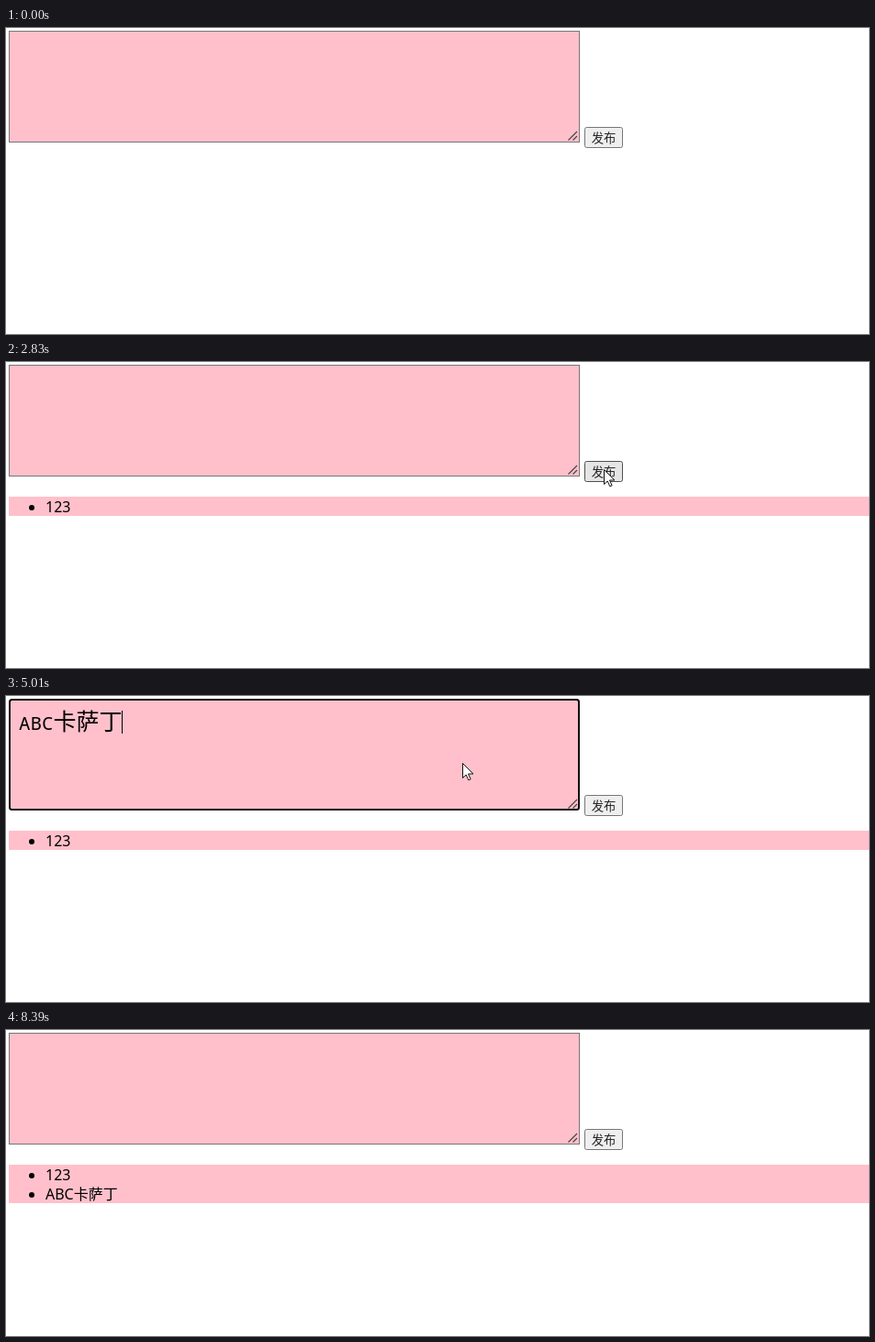
Write an HTML page that moves like this. It is 940 by 334 pixels and loops after 8.85 s.

```html
<!DOCTYPE html>
<html lang="zh-CN">
<head>
<meta charset="utf-8">
<title>发布</title>
<style>
  html, body { margin: 0; width: 100%; height: 100%; overflow: hidden; background: #fff; }
  svg { display: block; width: 940px; height: 334px; }
  text { white-space: pre; }
  .ui { font-family: "Noto Sans", "Noto Sans CJK SC", "Noto Sans CJK", sans-serif; }
  .item { font-size: 16px; }
  .button { font-size: 13.33px; fill: #222; }
  .ime { font-size: 22.6px; }
  .small { font: 25px "Liberation Serif", serif; }
  .caps { font: 300 20.8px "Noto Sans Mono", monospace; }
  .han { font: 300 25px "Noto Sans CJK SC", "Noto Sans CJK", sans-serif; }
</style>
</head>
<body>
<svg id="stage" viewBox="0 0 940 334" xmlns="http://www.w3.org/2000/svg"></svg>
<script>
const stage = document.getElementById('stage');
const LOOP = 8850, BLINK = 530, PINK = '#ffc0cb';
const FIRST = '123', SECOND = 'ABC卡萨丁';

// [time, field text, input candidates]; caret blinking restarts at each entry
const edits = [
  [0, ''],
  [460, ''],
  [1250, '1'],
  [1315, '12'],
  [1380, FIRST],
  [2830, ''],
  [3500, ''],
  [4100, 'a', '啊 阿 按 爱 安 暗 俺'],
  [4230, 'a’b', '阿布 阿爸 安保 岸边 阿宝 按不 奥巴'],
  [4360, 'a’b’c', '按不出 阿百川 ABC 阿布 北禾川谷银行 安保 岸边'],
  [4750, 'a’b’c’k’s', 'ABC开始 按不出 阿百川 ABC 阿布 安保 岸边'],
  [4820, 'a’b’c’k’s’d', 'ABC卡萨丁 按不出 阿百川 ABC 阿布 安保 岸边'],
  [5010, SECOND],
  [6670, '']
];

// Pointer moves: start, end, steps, destination
const START = [672, 189];
const moves = [
  [130, 460, 6, 423, 43],
  [2170, 2570, 7, 651, 117],
  [2960, 3300, 6, 497, 73],
  [5940, 6210, 5, 652, 118],
  [8330, 8330, 1, 711, 167]
];

const within = (t, a, b) => t >= a && t < b;
const inside = (p, x, y, w, h) => within(p[0], x, x + w) && within(p[1], y, y + h);
const isAscii = c => c.charCodeAt(0) < 128 || c === '’';
const rect = (x, y, w, h, fill, more = '') =>
  `<rect x="${x}" y="${y}" width="${w}" height="${h}" fill="${fill}" ${more}/>`;
const label = (x, y, cls, s, more = '') =>
  `<text x="${x}" y="${y}" class="${cls}" ${more}>${s}</text>`;
const line = (d, color, width = 1) =>
  `<path d="${d}" fill="none" stroke="${color}" stroke-width="${width}"/>`;

function pointerAt(t) {
  if (!within(t, 130, 8390)) return null;
  let p = START;
  moves.forEach(([from, to, n, x, y], i) => {
    if (t < from) return;
    const span = to - from || 1;
    const k = Math.min(n - 1, Math.floor((t - from) / span * (n - 1) + 1e-6));
    const f = i ? (k + 1) / n : k / (n - 1);
    const e = f * (2 - f);
    p = [Math.round(p[0] + (x - p[0]) * e), Math.round(p[1] + (y - p[1]) * e)];
  });
  return p;
}

// Half-width cells for Latin, full-width for Chinese
function fieldText(s) {
  let x = 14, out = '';
  for (const c of s) {
    const cls = !isAscii(c) ? 'han' : /[A-Z]/.test(c) ? 'caps' : 'small';
    out += label(x, 37, cls, c);
    x += isAscii(c) ? 12.5 : 25;
  }
  return { out, end: Math.floor(x) };
}

function field(t, edit, focused) {
  const { out, end } = fieldText(edit[1]);
  const caret = focused && Math.floor((t - edit[0]) / BLINK) % 2 === 0;
  return (focused
    ? rect(4, 4, 620, 120, PINK, 'rx="2.5" stroke="#101010" stroke-width="2"')
    : rect(3.5, 3.5, 621, 121, PINK, 'stroke="#767676"')) +
    line('M612.5 122.5L622 113M617.5 122.5L622 118', '#444', 1.2) +
    out + (caret ? rect(end, 16, 1, 25, '#000') : '');
}

function button(hover, pressed) {
  const [fill, edge] = pressed ? ['#f5f5f5', '#8d8d8d']
    : hover ? ['#e5e5e5', '#4f4f4f'] : ['#efefef', '#767676'];
  return rect(630.5, 108.5, 41, 22, fill, `rx="2" stroke="${edge}"`) +
    label(651, 124.5, 'ui button', '发布', 'text-anchor="middle"');
}

function list(items) {
  return items.map((s, i) => {
    const y = 147 + 21 * i;
    return rect(3, y, 937, 21, PINK) + `<circle cx="28" cy="${y + 12}" r="3"/>` +
      label(43, y + 17, 'ui item', s);
  }).join('');
}

function candidates(words) {
  let x = 16, out = rect(15.5, 39.5, 940, 55, '#fff', 'stroke="#e0e0e0"');
  words.split(' ').forEach((word, i) => {
    const width = 54 + [...word].reduce((w, c) => w + (isAscii(c) ? 14.8 : 22.6), 0);
    if (!i) out += rect(x, 40, width, 54, '#b3dbff');
    out += label(x + 15, 76, 'ui ime', i + 1, 'fill="#666"') +
      label(x + 39, 76, 'ui ime', word);
    x += width;
  });
  x = Math.round(x) - 0.5;
  return out + line(`M${x} 40V94M${x + 81} 40V94`, '#e0e0e0') +
    line(`M${x + 21} 61l-7 7l7 7`, '#999', 1.2) +
    line(`M${x + 60} 61l7 7l-7 7`, '#111', 1.4);
}

function pointer(p, beam) {
  const [x, y] = p;
  return beam
    ? line(`M${x - 3} ${y - 7.5}h3m1 0h3M${x + 0.5} ${y - 7}v14M${x - 3} ${y + 7.5}h3m1 0h3`, '#222')
    : `<path d="M${x + 0.5} ${y + 0.5}v16l3.7-3.5l2.6 5.8l2.3-1l-2.6-5.8h5.4z" fill="#fff" stroke="#111"/>`;
}

function scene(t) {
  const edit = edits.filter(e => e[0] <= t).pop();
  const focused = within(t, 460, 2770) || within(t, 3500, 6600);
  const pressed = within(t, 2770, 2830) || within(t, 6600, 6670);
  const p = pointerAt(t);
  const hover = p && inside(p, 630, 108, 42, 23);
  const beam = p && inside(p, 3, 3, 622, 122) && !within(t, 4100, 5940);
  const items = t < 2830 ? [] : t < 6670 ? [FIRST] : [FIRST, SECOND];
  return field(t, edit, focused) + button(hover, pressed) + list(items) +
    (edit[2] ? candidates(edit[2]) : '') + (p ? pointer(p, beam) : '');
}

let shown = '';
function update(now) {
  const next = scene(now % LOOP);
  if (next !== shown) stage.innerHTML = shown = next;
}

const began = performance.now();
function tick() {
  update(performance.now() - began);
  requestAnimationFrame(tick);
}
tick();
</script>
</body>
</html>
```
